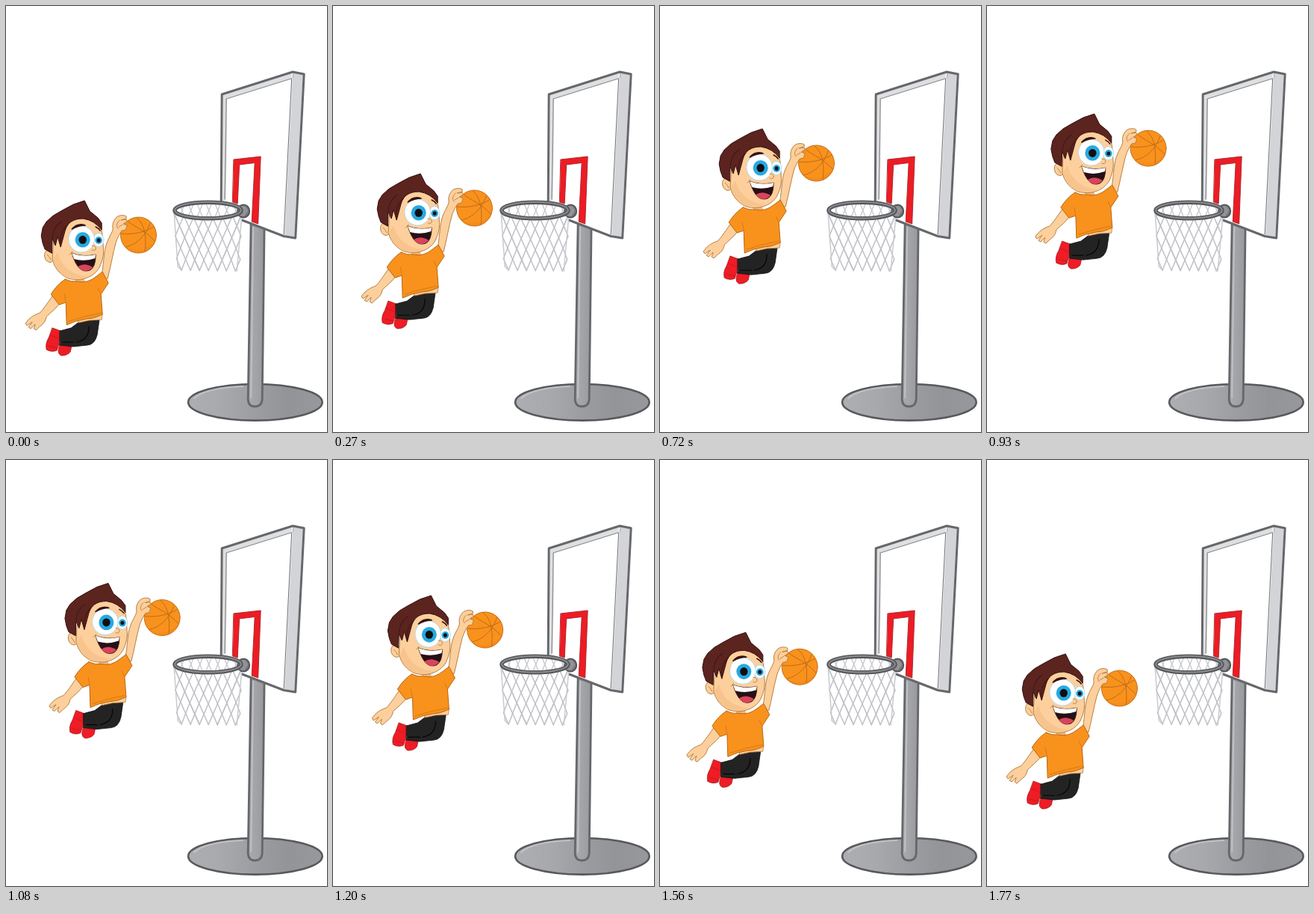
These frames come from a looping animation (430x569 px, 1.8 s). An HTML page with a canvas:

```html
<!DOCTYPE html>
<html lang="en">
<head>
<meta charset="utf-8">
<title>Slam dunk</title>
<style>
html, body { margin: 0; width: 100%; height: 100%; overflow: hidden; background: #fff; }
canvas { display: block; width: 430px; height: 569px; }
</style>
</head>
<body>
<canvas id="stage"></canvas>
<script>
const W = 430, H = 569, STEP = 30, FRAMES = 60, PEAK = 30;
const canvas = document.getElementById('stage');
const dpr = window.devicePixelRatio || 1;
canvas.width = W * dpr;
canvas.height = H * dpr;
const ctx = canvas.getContext('2d');
ctx.lineJoin = ctx.lineCap = 'round';

const SKIN = '#fdcf9c', SKIN_LINE = '#b5803f', GREY = '#66676a';

function shape(d, fill, line, width = 1) {
  const p = new Path2D(d);
  if (fill) { ctx.fillStyle = fill; ctx.fill(p); }
  if (line) { ctx.strokeStyle = line; ctx.lineWidth = width; ctx.stroke(p); }
}

function oval(x, y, rx, ry, fill, line, width = 1, turn = 0) {
  ctx.beginPath();
  ctx.ellipse(x, y, rx, ry, turn, 0, Math.PI * 2);
  if (fill) { ctx.fillStyle = fill; ctx.fill(); }
  if (line) { ctx.strokeStyle = line; ctx.lineWidth = width; ctx.stroke(); }
}

function strand(pts, color, width) {
  ctx.beginPath();
  pts.forEach(p => ctx.lineTo(...p));
  ctx.strokeStyle = color;
  ctx.lineWidth = width;
  ctx.stroke();
}

function across(x0, x1, ...colors) {
  const g = ctx.createLinearGradient(x0, 0, x1, 0);
  colors.forEach((c, i) => g.addColorStop(i / (colors.length - 1), c));
  return g;
}

function drawStand() {
  oval(334.7, 529.3, 89.8, 24.3, across(245, 424, '#adaeb1', '#a8a9ac', '#9c9da0', '#939498', '#97989c'), '#58595c', 2.6);
  shape('M253 524C264 514 290 509 318 508', null, 'rgba(205,206,209,.7)', 2);
  shape('M329 288L325 526Q326 535 334 535Q343 535 344 526L347 288Z', across(325, 347, '#a9aaae', '#a2a3a7', '#98999d'), GREY, 2.8);
  shape('M332 296L329 523', null, '#bfc0c3', 2);
}

function drawBoard() {
  shape('M290 118L385 88L400 91L388.500 310L373 307L317 286L289 263Z', '#fff');
  shape('M385 89L398.500 92L387 309L374 306Z', '#d3d4d7');
  shape('M291.500 119L384 90L383 97L296 124L295 207L293.500 263L291 261Z', '#dedfe1');
  shape('M383 97L296 124L295 205L294 258', null, '#898a8d', 1.3);
  shape('M383.500 97L373 305', null, '#77787b', 1.1);
  shape('M386 89L385 96', null, '#a6a7aa', 1);
  shape('M306 205L342 201L338.500 291L330 288L334 209.500L313.500 212L311 264L304.500 262Z', '#ed1c24', '#a92228', .9);
  shape('M289 263L290 118L385 88L400 91L388.500 310L373 307.500L317 286', null, GREY, 3);
}

function drawNet() {
  const rows = 5, cols = 14;
  // knot position: the net narrows slightly towards the bottom
  const knot = (c, r) => {
    const v = r / rows, u = c / cols;
    const bow = Math.sin(u * Math.PI);
    return [226 + 4 * v + u * (91 - 7 * v), 277 + bow * 7 * (1 - v) + v * (76 + u)];
  };
  // strands turn back at the sides
  const fold = k => k < 0 ? -k : k > cols ? 2 * cols - k : k;
  ctx.save();
  ctx.beginPath();
  ctx.ellipse(271, 273, 43, 10, 0, 0, Math.PI * 2);
  ctx.clip();
  for (let x = 232; x < 318; x += 12) {
    strand([[x, 284], [x + 9, 262]], '#c6c7cd', 1.3);
    strand([[x, 262], [x + 9, 284]], '#c6c7cd', 1.3);
  }
  ctx.restore();
  for (let c = 0; c <= cols; c += 2) {
    for (const dir of [1, -1]) {
      const pts = [];
      for (let r = 0; r <= rows; r++) pts.push(knot(fold(c + dir * r), r));
      strand(pts, '#c0c1c8', 1.5);
    }
  }
  strand([[226, 277], [231, 348], [236, 353]], '#c9cad0', 1.5);
  strand([[317, 277], [310, 354]], '#c9cad0', 1.5);
}

function drawRim() {
  oval(319, 274, 8, 8.5, '#77787b', '#56575a', 2);
  shape('M312 268L321 267L325 273L320 281L313 280Z', '#929396');
  oval(271.3, 273, 44.5, 10.8, null, '#56575a', 5.5);
  oval(271.3, 272.7, 44.5, 10.8, null, '#8d8e91', 1.8);
}

function drawBall() {
  const x = 178.3, y = 306;
  oval(x, y, 24, 24, '#f8921d', '#c4701a', 1);
  ctx.save();
  ctx.beginPath();
  ctx.arc(x, y, 23.5, 0, Math.PI * 2);
  ctx.clip();
  shape('M154 312C163 329 184 333 202 312L202 332L154 332Z', 'rgba(238,125,20,.35)');
  const seam = '#c06a17';
  shape('M155 304C170 306 190 302 201 293', null, seam, 1);
  shape('M173 281C184 287 190 302 187 329', null, seam, 1);
  shape('M163 287C174 296 187 299 200 314', null, seam, 1);
  shape('M160 322C172 320 188 310 195 287', null, seam, 1);
  ctx.restore();
}

function drawLimbs() {
  // throwing arm and hand
  shape('M128 362C132 350 131 328 136 316C139 308 143 303 144 298C143 292 144 287 149 282C153 279 159 279 162 281L162 284L155 286L162 285L163 288L158 291L163 293L161 299L156 300C153 304 150 310 148 316C144 331 141 348 137 364Z', SKIN, SKIN_LINE, 1);
  shape('M151 297C148 294 149 290 153 286M157 292L152 295', null, SKIN_LINE, .9);
  // trailing arm and hand
  shape('M64 386C58 394 52 404 46 410C39 412 31 417 27 424L29 427L36 422L31 429L34 431L40 425L38 431L41 433L46 428C51 425 54 421 55 415C61 409 68 404 73 397Z', SKIN, SKIN_LINE, 1);
}

function drawLegs() {
  shape('M63 430L74 434L73 447L69 460Q62 463 55 459Q53 451 58 443Z', '#ee1c25', '#a9151c', .8);
  shape('M61 440L70 444M58 454L69 457', null, '#bd1820', .8);
  shape('M73 451L89 453L87 462Q83 467 75 467Q70 465 71 459Z', '#ee1c25', '#a9151c', .8);
  shape('M73 434L88 430L100 421L126 418L123 439Q120 452 110 453L91 455L73 453Z', '#242324', '#111', .8);
  shape('M112 428C112 439 107 447 95 449M76 449L91 449', null, '#050505', 1.2);
  shape('M98 416L130 411L129 419L112 420L98 423Z', SKIN, SKIN_LINE, .8);
}

function drawShirt() {
  shape('M92 356L104 358L108 373L94 374Z', '#efb67d');
  shape('M80 365Q88 369 97 368Q110 371 122 361L130 355L138 370L128 385L130 412Q118 418 108 418Q94 420 82 426L81 396L72 399L61 385Q69 372 80 365Z', '#f8921d', '#b96613', 1);
  shape('M81 395L79 385M128 385L124 377M85 421Q106 414 128 410', null, '#d97915', 1);
}

function drawHead() {
  oval(59, 334, 6.5, 8.5, SKIN, SKIN_LINE, 1, -.25);
  shape('M61 339Q58 333 56 332', null, SKIN_LINE, .9);
  shape('M64 320C65 294 90 276 117 282Q129 290 130 306L131 320Q133 335 126 349C118 364 97 369 82 363Q67 355 63 339Z', SKIN, SKIN_LINE, 1);
  shape('M64 338Q67 354 81 362Q95 367 110 361C94 360 76 352 70 329Z', '#f8c48d');
  // hair
  shape('M62 330L53 325L50 317L48 307L50 296L55 288L64 280L76 273L91 265L106 260L113 274L124 283L129 290L129 299Q119 286 104 284C90 284 83 290 80 300L74 322L70 308L67 320L63 311Z', '#5b241f', '#35100e', 1);
  shape('M63 309Q64 295 75 288M74 320Q72 303 83 293', null, '#431713', 1.1);
  // eyes
  oval(124.8, 312.5, 7, 9, '#fff', '#a5d8ee', .9);
  oval(125, 313, 4.8, 5, '#27a9e1');
  oval(125, 313, 2.5, 2.7, '#101010');
  oval(102, 311.5, 17.3, 17.5, '#fff', '#b5ddef', 1);
  oval(103.5, 312.3, 10, 10.3, '#27a9e1');
  oval(103.5, 312.3, 5.2, 5.5, '#101010');
  shape('M89 298Q97 289 107 293Q98 293 89 298Z', '#351310', '#351310', 1.5);
  shape('M121 295Q125 297 127 300', null, '#351310', 1.6);
  shape('M116 320Q122 320 121 325Q119 328 116 326', SKIN, SKIN_LINE, .9);
  // mouth
  shape('M89 330Q104 336 121 332Q121 349 113 353Q105 356 99 350Q93 344 89 330Z', '#251015', '#42180f', .9);
  shape('M89 330Q104 336 121 332L120 337Q106 342 92 338Z', '#fff');
  shape('M97 348Q106 342 117 349Q113 354 106 354Q100 352 97 348Z', '#d9445c');
  shape('M86 332Q88 330 90 328', null, SKIN_LINE, .9);
}

function drawBoy() {
  drawBall();
  drawLegs();
  drawLimbs();
  drawShirt();
  drawHead();
}

// straight climb to the peak, then straight back down
function offset(n) {
  const k = n / PEAK, back = (FRAMES - 1 - n) / (FRAMES - 1 - PEAK);
  return n <= PEAK ? [40 * k, -120 * k] : [40 * back, -1 - 119 * back];
}

function render(now) {
  const n = Math.floor(now / STEP) % FRAMES;
  ctx.setTransform(dpr, 0, 0, dpr, 0, 0);
  ctx.fillStyle = '#fff';
  ctx.fillRect(0, 0, W, H);
  ctx.translate(-.8, 0);
  drawStand();
  drawBoard();
  drawNet();
  drawRim();
  ctx.translate(...offset(n));
  drawBoy();
}

let start = null;
function tick(now) {
  if (start === null) start = now;
  render(Math.max(0, now - start));
  requestAnimationFrame(tick);
}
render(0);
requestAnimationFrame(tick);
</script>
</body>
</html>
```
